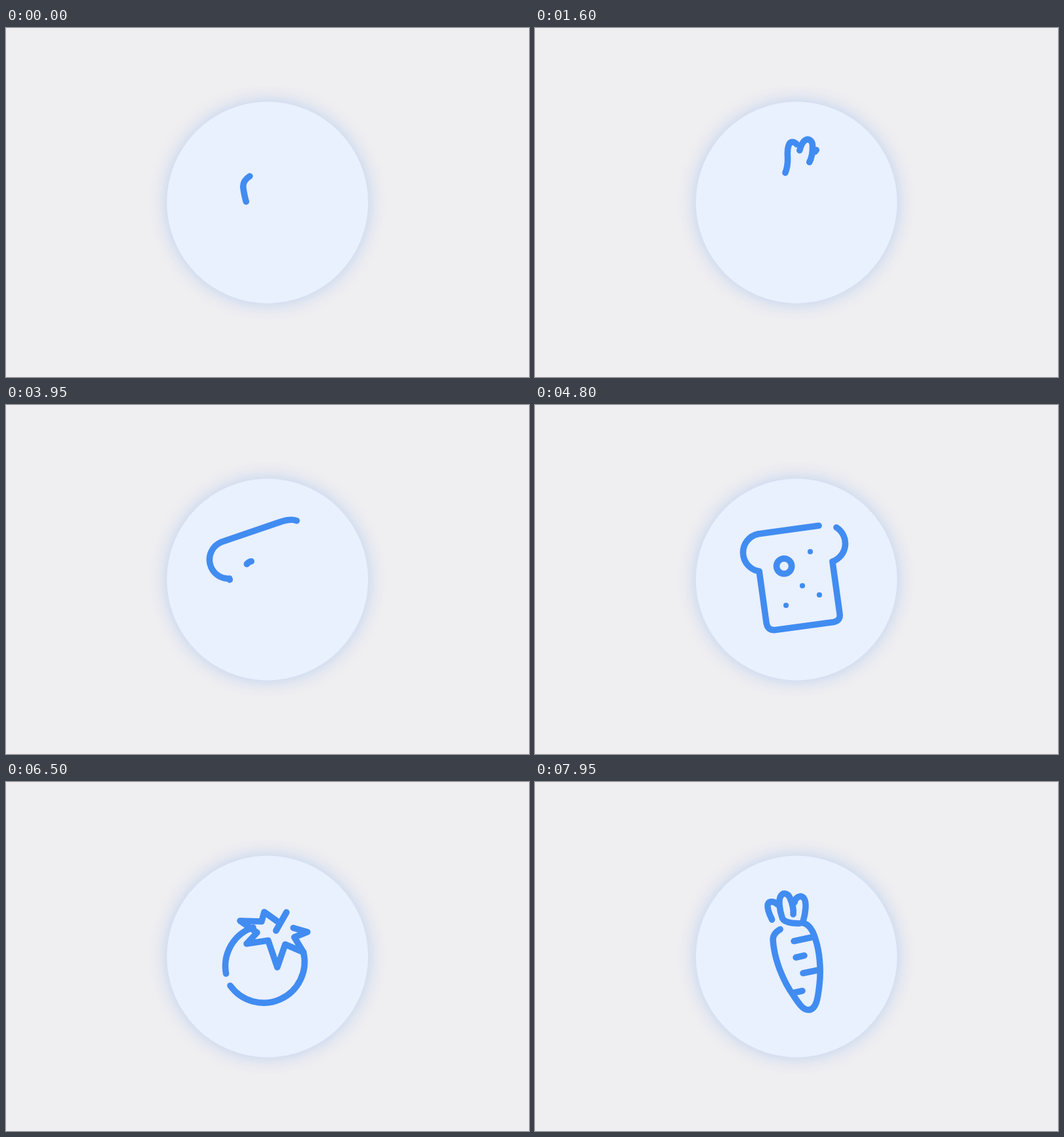
Animation of 800x533 px, one loop 8000 ms. Source, as an HTML page:

```html
<!DOCTYPE html>
<html lang="en">
<head>
<meta charset="utf-8">
<title>Food icons</title>
<style>
  html, body { margin: 0; width: 100%; height: 100%; overflow: hidden; background: #efeef1; }
  svg { display: block; width: 100vw; height: 100vh; }
  .disc { fill: #e9f0fe; filter: drop-shadow(0 0 13px rgba(110, 165, 235, .42)); }
  .icon path { fill: none; stroke: #418cf1; stroke-width: 9.6; stroke-linecap: round; stroke-linejoin: round; }
  .icon circle { fill: #418cf1; }
</style>
</head>
<body>
<svg viewBox="0 0 800 533">
  <circle class="disc" cx="400" cy="266.5" r="154"/>
</svg>
<script>
const LOOP = 8000, SPAN = 1860;
const NS = 'http://www.w3.org/2000/svg';
const svg = document.querySelector('svg');

// line(path, draw start, draw end, erase start, erase end); times are local to the icon
const line = (d, ...times) => ({ d, times });
const dot = (x, y, ...times) => ({ x, y, times });

// pose: local time at which the outlines are upright as written; swing: total turn in degrees
const icons = [
  { starts: [-75, 7375], pose: 575, swing: 31, parts: [
    line('M375 225C368 229 364 234 364 241C366 272 380 305 396 327C404 339 410 348 418 348C431 348 433 328 435 310C438 285 435 258 429 240C425 226 418 216 408 215', 0, 520, 900, 1620),
    line('M410 213C414 200 416 183 411 177C406 172 398 176 397 184', 340, 550, 1200, 1690),
    line('M404 216C392 216 380 214 378 207C374 195 372 180 376 174C380 168 387 170 390 177C393 184 396 193 395 202', 340, 560, 1400, 1823),
    line('M371 187C366 182 358 181 356 187C355 193 359 203 362 209C365 216 367 224 367 231', 400, 665, 1600, 1870),
    line('M424 237L396 243', 220, 400, 1050, 1400),
    line('M399 268L412 265', 260, 420, 1050, 1380),
    line('M434 287L410 292', 220, 400, 1000, 1350),
    line('M395 322L409 319', 200, 360, 950, 1300)
  ] },
  { starts: [1800], pose: 1250, swing: 31, parts: [
    line('M419 217L424 206L429 197Q432 189 423 190L367 195Q362 197 366 204L371 213C374 220 378 223 385 222L416 218.5Q426 218 428 228L448.500 318Q450 331 438 333L380 338Q365 338 364 324L367 268C368 250 370 235 379 222', 0, 1398, 1130, 1830),
    line('M410 246L423 307', 350, 800, 1320, 1700),
    line('M388 278L388 310', 500, 850, 1350, 1720),
    dot(384, 208, 300, 450, 1300, 1500),
    dot(396, 207, 360, 510, 1350, 1550),
    dot(408, 205, 420, 570, 1400, 1600)
  ] },
  { starts: [3650], pose: 1150, swing: 31, parts: [
    line('M461 187C453 182 443 183 432 184.500L341 197A29 29 0 0 0 343 254L354 333Q356 345 368 343.500L457 331.500Q468 329 466 318L455 239A29 29 0 0 0 461 187', 0, 820, 950, 1850),
    line('M381 234.500A11.600 11.600 0 1 0 381 257.700A11.600 11.600 0 1 0 381 234.500', 250, 700, 1200, 1700),
    dot(421, 224, 300, 450, 1350, 1550),
    dot(409, 276, 400, 550, 1400, 1600),
    dot(435, 290, 500, 650, 1450, 1650),
    dot(384, 306, 450, 600, 1300, 1500)
  ] },
  { starts: [5500], pose: 1000, swing: 13, parts: [
    line('M418 215L395 198.500L391 213L358 212L384 230L368 247L401 242L415 283L427 248L455 260L441 237L461 229L440 223L418 215', 0, 1067, 1010, 1850),
    line('M429 199L413 227', 0, 120, 1300, 1800),
    line('M378 222A62.700 62.700 0 0 0 343 311', 300, 1154, 1080, 1780),
    line('M455 260A62.700 62.700 0 0 1 343 311', 200, 900, 1020, 1750)
  ] }
];

function add(parent, tag, attrs) {
  const el = document.createElementNS(NS, tag);
  for (const key in attrs) el.setAttribute(key, attrs[key]);
  return parent.appendChild(el);
}

for (const icon of icons) {
  icon.el = add(svg, 'g', { class: 'icon' });
  for (const part of icon.parts) {
    part.el = part.d
      ? add(icon.el, 'path', { d: part.d, pathLength: 1 })
      : add(icon.el, 'circle', { cx: part.x, cy: part.y });
  }
}

const progress = (t, a, b) => Math.min(1, Math.max(0, (t - a) / (b - a)));

function drawPart({ el, d, times: [a, b, c, e] }, t) {
  const head = progress(t, a, b);
  const tail = progress(t, c, e) ** 2;
  const size = head - tail;
  if (!d) {
    el.setAttribute('r', 4.1 * Math.max(0, size));
    return;
  }
  el.style.display = size > .002 ? '' : 'none';
  el.setAttribute('stroke-dasharray', size >= 1 ? 'none' : `${Math.max(0, size)} 2`);
  el.setAttribute('stroke-dashoffset', -tail);
}

function render(time) {
  for (const icon of icons) {
    const start = icon.starts.find(s => time > s && time < s + SPAN + 20);
    icon.el.style.display = start === undefined ? 'none' : '';
    if (start === undefined) continue;
    const t = time - start;
    const turn = icon.swing * ((t / SPAN) ** 2 - (icon.pose / SPAN) ** 2);
    icon.el.setAttribute('transform', `rotate(${turn} 400 266.5)`);
    icon.parts.forEach(part => drawPart(part, t));
  }
}

const begin = performance.now();
function tick() {
  render((performance.now() - begin) % LOOP);
  requestAnimationFrame(tick);
}
tick();
</script>
</body>
</html>
```
